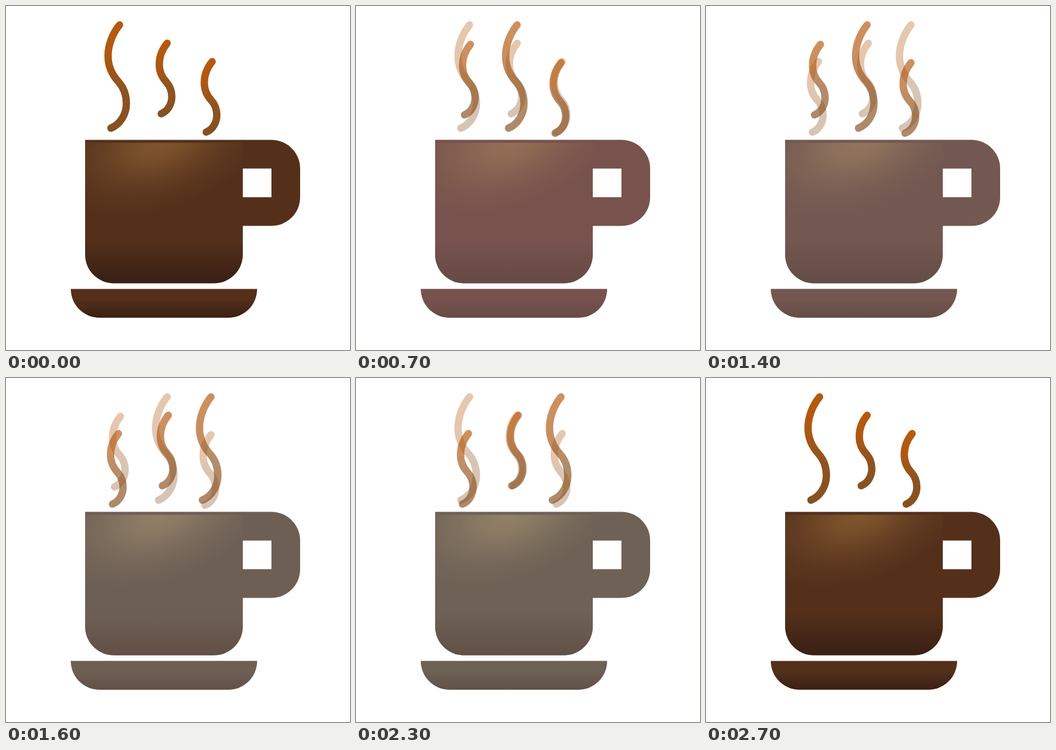
Recreate the animation shown at these times as an HTML page with a canvas. Size 600 by 600 pixels, loop 2800 ms.

```html
<!DOCTYPE html>
<html lang="en">
<head>
<meta charset="utf-8">
<title>Steaming cup</title>
<style>
  html, body { margin: 0; width: 100%; height: 100%; overflow: hidden; background: #fff; }
  canvas { display: block; width: 600px; height: 600px; }
</style>
</head>
<body>
<canvas id="stage" width="600" height="600"></canvas>
<script>
const SIZE = 600;
const ctx = document.getElementById('stage').getContext('2d');

// Each pose: cup colours (r,g,b) and steam wisps as [x, y, scale].
const SMALL = 0.683;
const poses = [
  { base: '84,48,27', glow: '128,86,46', shade: '56,31,21',
    steam: [[198, 33, 1], [281, 65, SMALL], [359.5, 97, SMALL]] },
  { base: '82,32,28', glow: '118,68,36', shade: '60,22,18',
    steam: [[199.5, 67, SMALL], [281, 33, 1], [357.5, 99, SMALL]] },
  { base: '68,54,39', glow: '114,96,66', shade: '54,32,20',
    steam: [[196, 97, SMALL], [283, 65, SMALL], [357.5, 33, 1]] }
];

const wisp = new Path2D('M0 0C-13 16-20 36-20 54C-20 72-13 87-2 99' +
  'C8 110 12 123 12 137C12 155 2 173-15 180');
const body = new Path2D('M138 233.5H413V433.5A50 50 0 0 1 363 483.5H188A50 50 0 0 1 138 433.5Z');
const handle = new Path2D('M412 233.5H463A50 50 0 0 1 513 283.5V333.5A50 50 0 0 1 463 383.5H412Z' +
  'M413 283.5V333.5H463V283.5Z');
const saucer = new Path2D('M113 493.5H438A50 50 0 0 1 388 543.5H163A50 50 0 0 1 113 493.5Z');

function fade(g, y0, y1, rgb) {
  const grad = g.createLinearGradient(0, y0, 0, y1);
  grad.addColorStop(0, `rgba(${rgb},0)`);
  grad.addColorStop(1, `rgba(${rgb},1)`);
  return grad;
}

function fillGlow(g, rgb) {
  const grad = g.createRadialGradient(0, 0, 0, 0, 0, 1);
  [[0, 1], [0.25, 0.78], [0.5, 0.42], [0.75, 0.15], [1, 0]]
    .forEach(([at, a]) => grad.addColorStop(at, `rgba(${rgb},${a})`));
  g.save();
  g.clip(body);
  g.beginPath();
  g.rect(138, 238.5, 275, 245);
  g.clip();
  g.translate(268, 238.5);
  g.rotate(-20 * Math.PI / 180);
  g.scale(200, 115);
  g.fillStyle = grad;
  g.fillRect(-1, -1, 2, 2);
  g.restore();
}

function strokeWisp(g, [x, y, scale]) {
  const grad = g.createLinearGradient(0, -6, 0, 186);
  grad.addColorStop(0, 'rgb(182,89,15)');
  grad.addColorStop(0.3, 'rgb(176,88,17)');
  grad.addColorStop(0.62, 'rgb(142,83,31)');
  grad.addColorStop(1, 'rgb(134,80,34)');
  g.save();
  g.translate(x, y);
  g.scale(scale, scale);
  g.lineWidth = 12.8 / scale;
  g.lineCap = 'round';
  g.strokeStyle = grad;
  g.stroke(wisp);
  g.restore();
}

function renderPose(pose) {
  const layer = document.createElement('canvas');
  layer.width = layer.height = SIZE;
  const g = layer.getContext('2d');
  g.fillStyle = `rgb(${pose.base})`;
  g.fill(body);
  g.fill(handle, 'evenodd');
  g.fill(saucer);
  fillGlow(g, pose.glow);
  g.fillStyle = fade(g, 408, 484, pose.shade);
  g.fill(body);
  g.fillStyle = fade(g, 512, 544, pose.shade);
  g.fill(saucer);
  pose.steam.forEach(w => strokeWisp(g, w));
  return layer;
}

const layers = poses.map(renderPose);
const HOLD = 500, STEP = 200, PHASE = HOLD + 2 * STEP, LOOP = 2800;

function weights(t) {
  const from = Math.floor(t / PHASE) % 3;
  const local = t % PHASE;
  const mix = local < HOLD ? 0 : local < HOLD + STEP ? 1 / 3 : 2 / 3;
  const w = [0, 0, 0];
  w[from] = 1 - mix;
  w[(from + 1) % 3] = mix;
  return w;
}

function draw(now) {
  ctx.globalAlpha = 1;
  ctx.fillStyle = '#fff';
  ctx.fillRect(0, 0, SIZE, SIZE);
  weights(now % LOOP).forEach((w, i) => {
    if (!w) return;
    ctx.globalAlpha = w;
    ctx.drawImage(layers[i], 0, 0);
  });
}

let start = null;
function tick(now) {
  if (start === null) start = now;
  draw(now - start);
  requestAnimationFrame(tick);
}
draw(0);
requestAnimationFrame(tick);
</script>
</body>
</html>
```
